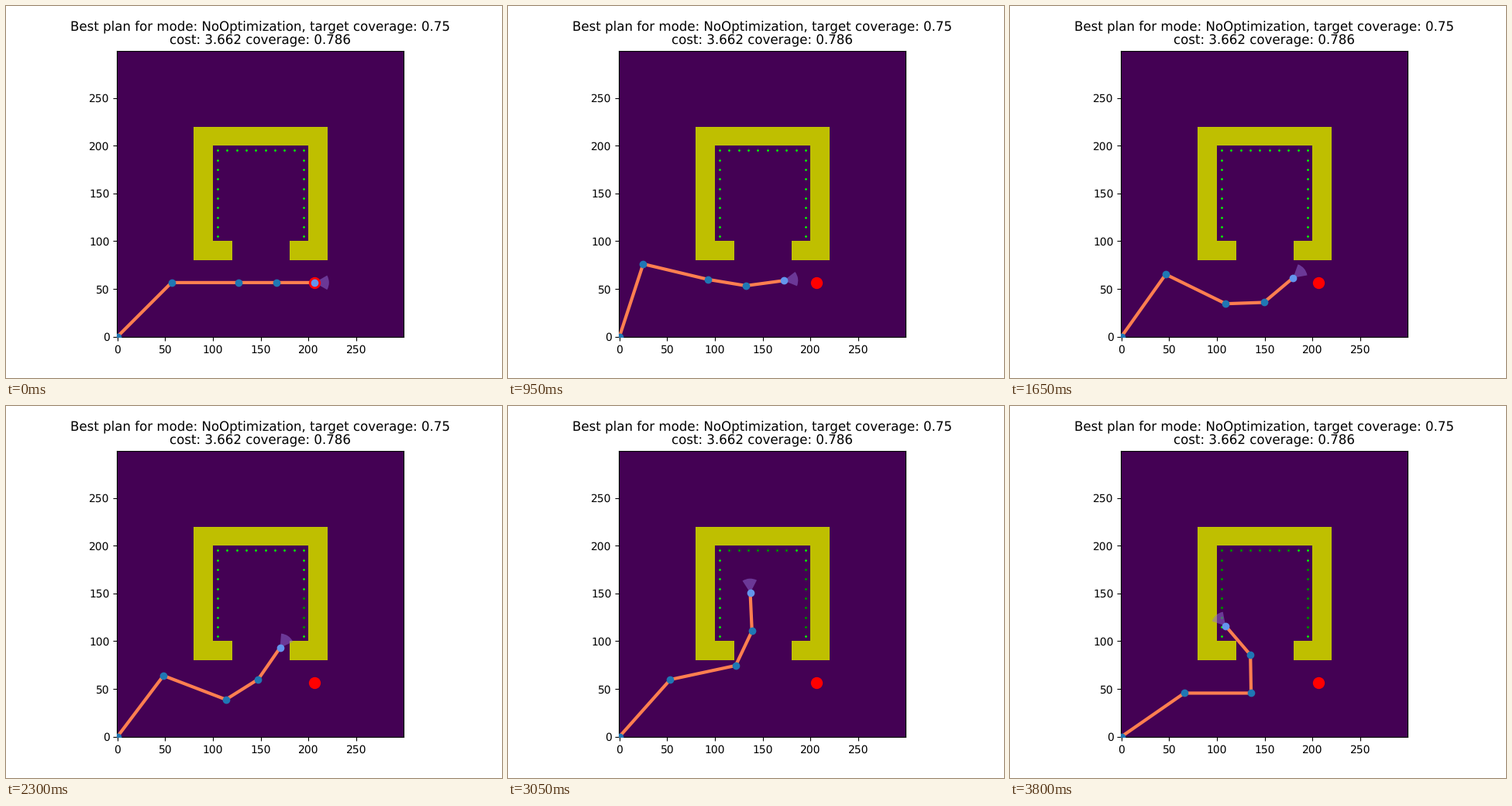
Recreate the animation shown at these times as a matplotlib script. Size 640 px wide and 480 px high, loop 3850 ms.

```python
import numpy as np
import matplotlib.pyplot as plt
from matplotlib.animation import FuncAnimation
from matplotlib.patches import Rectangle, Wedge

plt.rcParams["font.family"] = "DejaVu Sans"
plt.rcParams["text.hinting"] = "none"

FRAMES, INTERVAL = 77, 50
LINKS = np.array([80, 70, 40, 40])
HALF_FOV, SENSOR_RANGE, WEDGE_RADIUS = 30, 60, 15

# Joint angles in degrees at the corners of the planned path
STEPS = [0, 19, 33, 44, 60, 76]
CORNERS = np.array([
    [45, -45, 0, 0],
    [71.9, -85.3, 4.0, 17.1],
    [54.6, -80.7, 28.1, 38.1],
    [53.5, -79.3, 53.5, 22.6],
    [49.2, -36.3, 50.0, 27.2],
    [34.7, -34.7, 91.0, 39.6],
])

# x, y, width, height
WALLS = [
    (80, 80, 20, 140), (200, 80, 20, 140), (100, 200, 100, 20),
    (100, 80, 20, 20), (180, 80, 20, 20),
]

SPOTS = np.array(
    [(105, y) for y in range(105, 200, 10)]
    + [(x, 195) for x in range(115, 190, 10)]
    + [(195, y) for y in range(105, 200, 10)], float)

# Title lines with their height above the axes in points
TITLE = [
    ("Best plan for mode: NoOptimization, target coverage: 0.75", 18.24),
    ("cost: 3.662 coverage: 0.786", 6),
]


def pose(frame):
    """Joint positions and the heading of the last link."""
    bends = [np.interp(frame, STEPS, column) for column in CORNERS.T]
    angles = np.cumsum(bends)
    rad = np.radians(angles)
    steps = LINKS[:, None] * np.column_stack([np.cos(rad), np.sin(rad)])
    return np.vstack([[0, 0], np.cumsum(steps, axis=0)]), angles[-1]


def blocked(start, end):
    ray = start + np.linspace(0, 1, 80)[:, None] * (end - start)
    x, y = ray.T
    return any(np.any((x > left) & (x < left + w) & (y > low) & (y < low + h))
               for left, low, w, h in WALLS)


def visible(tip, heading, spot):
    dx, dy = spot - tip
    if np.hypot(dx, dy) > SENSOR_RANGE:
        return False
    turn = (np.degrees(np.arctan2(dy, dx)) - heading + 180) % 360 - 180
    return abs(turn) <= HALF_FOV and not blocked(tip, spot)


def coverage():
    """For every frame, which spots have been seen so far."""
    seen = np.zeros((FRAMES, len(SPOTS)), bool)
    for i in range(FRAMES):
        joints, heading = pose(i)
        now = [visible(joints[-1], heading, spot) for spot in SPOTS]
        seen[i] = seen[i - 1] | now if i else now
    return seen


SEEN = coverage()

fig, ax = plt.subplots(figsize=(6.4, 4.8), dpi=100)
ax.imshow(np.zeros((300, 300)), origin="lower", cmap="viridis")
for text, rise in TITLE:
    ax.annotate(text, (0.5, 1), xycoords="axes fraction", xytext=(0, rise),
                textcoords="offset points", ha="center", va="baseline",
                fontsize=12)

for left, low, w, h in WALLS:
    ax.add_patch(Rectangle((left, low), w, h, facecolor="y", linewidth=0,
                           antialiased=False))

unseen_dots = ax.scatter([], [], s=1, color="lime", zorder=1)
seen_dots = ax.scatter([], [], s=2, color="g", zorder=1)
fov = ax.add_patch(Wedge((0, 0), WEDGE_RADIUS, 0, 1, facecolor="mediumpurple",
                         linewidth=0, alpha=0.5))
arm, = ax.plot([], [], color="coral", linewidth=3, zorder=3)
joint_dots, = ax.plot([], [], "o", color="tab:blue", zorder=3)
ax.plot(*pose(0)[0][-1], "o", color="red", markersize=10, zorder=3)
tip_dot, = ax.plot([], [], "o", color="cornflowerblue", zorder=3)
ax.set_xlim(-0.5, 299.5)
ax.set_ylim(-0.5, 299.5)


def draw(frame):
    joints, heading = pose(frame)
    arm.set_data(*joints.T)
    joint_dots.set_data(*joints[:-1].T)
    tip_dot.set_data(*joints[-1:].T)
    fov.set_center(tuple(joints[-1]))
    fov.set_theta1(heading - HALF_FOV)
    fov.set_theta2(heading + HALF_FOV)
    seen = SEEN[frame]
    seen_dots.set_offsets(SPOTS[seen])
    unseen_dots.set_offsets(SPOTS[~seen])
    return fov, unseen_dots, seen_dots, arm, joint_dots, tip_dot


anim = FuncAnimation(fig, draw, frames=FRAMES, interval=INTERVAL,
                     repeat=True, repeat_delay=0)
plt.show()
```
